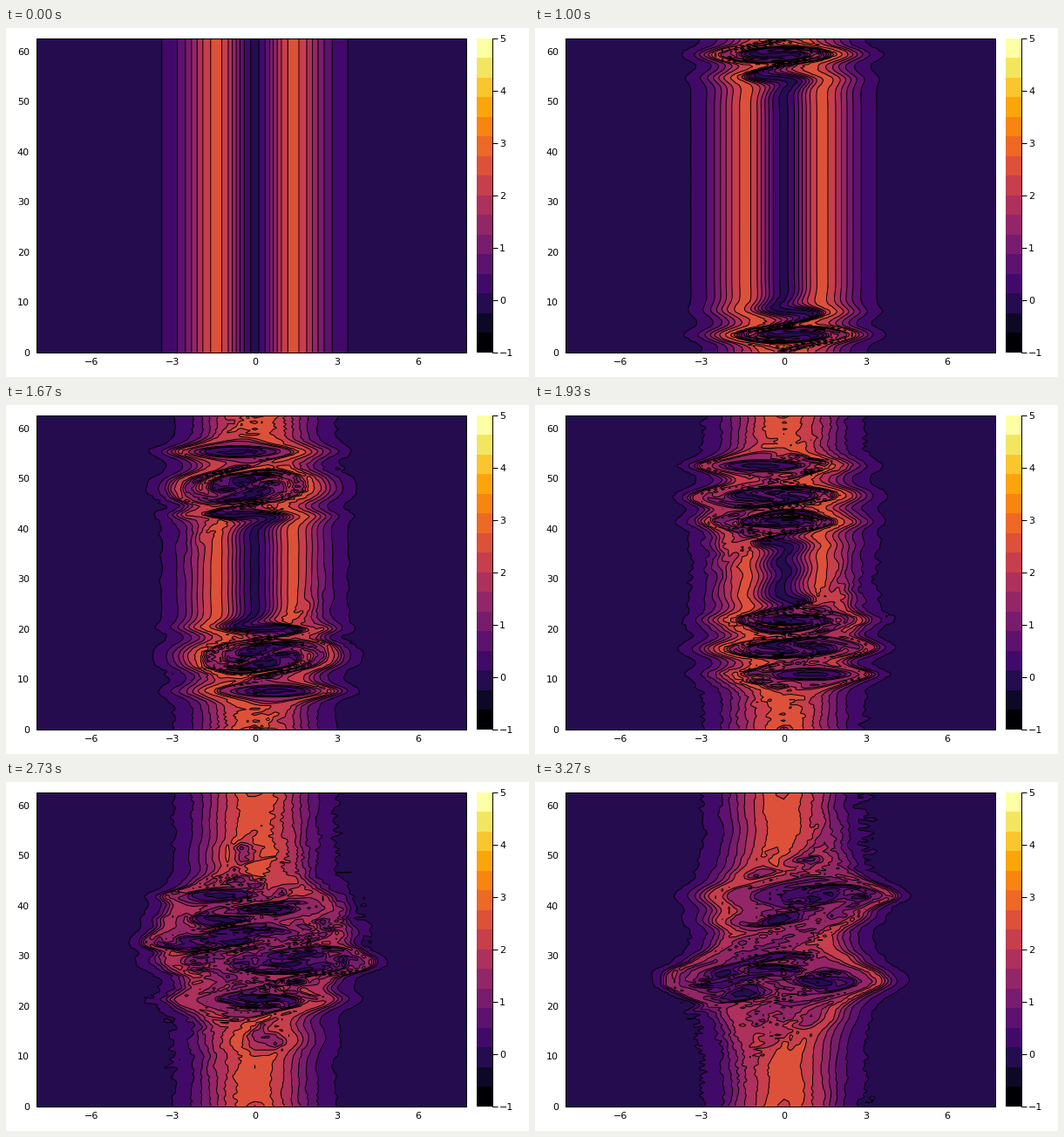
These frames come from a looping animation (600x400 px, 3340 ms). A matplotlib script:

```python
import numpy as np
import matplotlib.pyplot as plt
from matplotlib.animation import FuncAnimation

WIDTH, HEIGHT, DPI = 600, 400, 100
PX = 72 / DPI                      # one pixel in points
LOOP_MS, TICK_MS, STATE_MS = 3340, 20, 200 / 3
STATES = 50

# Phase space: position x (periodic) and velocity v
NX, NV, LENGTH, VMAX = 256, 64, 20 * np.pi, 8.0
DX, DV = LENGTH / NX, 2 * VMAX / NV
x = np.arange(NX) * DX
v = -VMAX + np.arange(NV) * DV
STEPS = 20                         # time steps per unit of time
DT = 1 / STEPS


def bump(center):
    distance = (x - center + LENGTH / 2) % LENGTH - LENGTH / 2
    return np.exp(-2 * distance**2)


def simulate():
    """Two-stream instability: split-step spectral Vlasov-Poisson solver."""
    kx = 2 * np.pi * np.fft.rfftfreq(NX, DX)
    kv = 2 * np.pi * np.fft.rfftfreq(NV, DV)
    drift = np.exp(-0.5j * DT * np.outer(kx, v))
    drift *= np.exp(-DT * (kx / kx[-1])**8)[:, None]
    smooth_v = np.exp(-DT * (kv / kv[-1])**8)
    inv_k = np.zeros(len(kx), complex)
    inv_k[1:] = 1 / (1j * kx[1:])

    def move(f):
        return np.fft.irfft(np.fft.rfft(f, axis=0) * drift, NX, axis=0)

    def kick(f):
        density = f.sum(axis=1) * DV
        field = np.fft.irfft(np.fft.rfft(density) * inv_k, NX)
        turn = np.exp(-1j * DT * np.outer(field, kv)) * smooth_v
        return np.fft.irfft(np.fft.rfft(f, axis=1) * turn, NV, axis=1)

    seed = 1 + 4e-4 * bump(0) - 1.6e-10 * bump(32.5)
    f = np.outer(seed, 3.4 * v**2 * np.exp(-v**2 / 2))
    yield f
    for _ in range(STATES - 1):
        for _ in range(STEPS):
            f = move(kick(move(f)))
        yield f


def pixel_axes(left, top, right, bottom):
    return fig.add_axes([left / WIDTH, 1 - bottom / HEIGHT,
                         (right - left) / WIDTH, (bottom - top) / HEIGHT])


plt.rcParams.update({"font.family": "DejaVu Sans", "font.size": 8})
fig = plt.figure(figsize=(WIDTH / DPI, HEIGHT / DPI), dpi=DPI, facecolor="white")
levels = np.linspace(-1, 5, 17)
colors = [plt.get_cmap("inferno")(i / 15) for i in range(16)]

ax = pixel_axes(35, 12, 528, 371.5)
ax.set_facecolor(colors[2])
pictures = []
for f in simulate():
    f = np.clip(f, -0.999, 4.999)
    fill = ax.contourf(v, x, f, levels=levels, colors=colors, antialiased=False)
    lines = ax.contour(v, x, f, levels=levels, colors="black",
                       linewidths=PX, linestyles="solid")
    pictures.append((fill, lines))
ax.set(xlim=(v[0], v[-1]), ylim=(0, x[-1]),
       xticks=range(-6, 7, 3), yticks=range(0, 61, 10))
ax.tick_params(length=0)
ax.tick_params(axis="x", pad=6 * PX)
ax.tick_params(axis="y", pad=8 * PX)

bar = pixel_axes(540, 11.5, 558, 371.5)
bar.bar([0.5] * 16, np.diff(levels), 1, levels[:-1], color=colors,
        linewidth=0, antialiased=False)
bar.set(xlim=(0, 1), ylim=(-1, 5), xticks=[], yticks=range(-1, 6))
bar.yaxis.tick_right()
bar.tick_params(axis="y", length=6 * PX, width=PX, pad=2 * PX)
for side in ("left", "top", "bottom"):
    bar.spines[side].set_visible(False)
for spine in (*ax.spines.values(), bar.spines["right"]):
    spine.set_linewidth(PX)


def update(tick):
    state = min(int((tick * TICK_MS + 15) / STATE_MS), STATES - 1)
    for i, picture in enumerate(pictures):
        for artist in picture:
            artist.set_visible(i == state)
    return pictures[state]


anim = FuncAnimation(fig, update, frames=LOOP_MS // TICK_MS, interval=TICK_MS,
                     init_func=lambda: update(0), repeat=True, repeat_delay=0,
                     blit=False)
plt.show()
```
